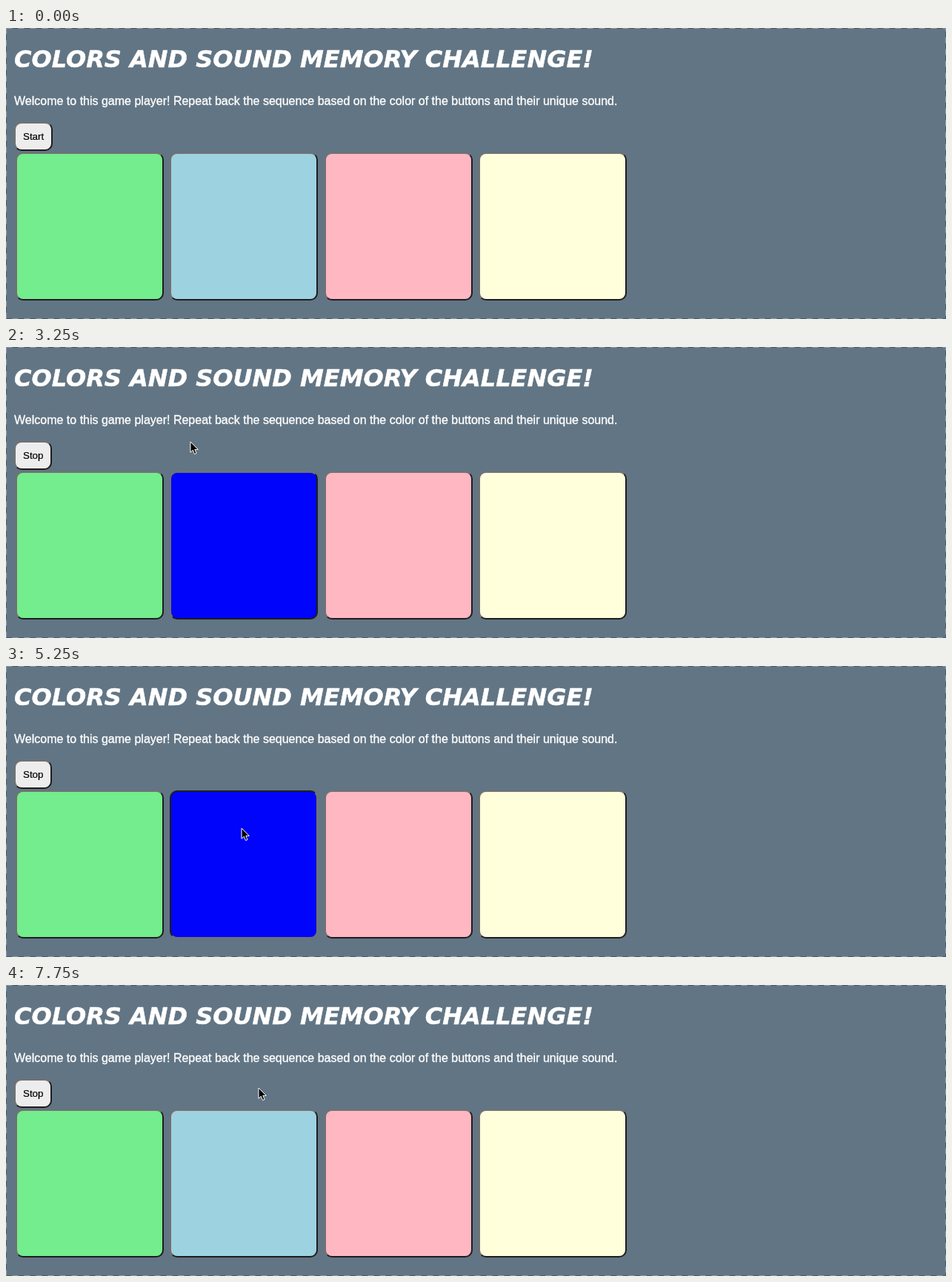
Recreate the animation shown at these times as an HTML page. Size 1269 by 393 pixels, loop 8 s.

```html
<!DOCTYPE html>
<html lang="en">
<head>
<meta charset="utf-8">
<title>Memory game</title>
<style>
  html, body { margin: 0; width: 100%; height: 100%; overflow: hidden; background: #627584; }
  #stage { position: absolute; left: 0; top: 0; width: 1269px; height: 393px; overflow: hidden; }
  .btn {
    position: absolute; box-sizing: border-box; border: 2px solid; border-radius: 10px;
    border-color: #737171 #1d1d1d #1d1d1d #737171;
  }
  .btn.down { border-color: #1d1d1d #737171 #737171 #1d1d1d; }
  .pad { top: 168px; width: 200px; height: 200px; }
  #toggle { left: 11px; top: 127px; height: 39px; background: #ededed; }
  svg { position: absolute; left: 0; top: 0; }
  text { font-family: "Liberation Sans", Arial, sans-serif; fill: #fff; stroke: #fff; stroke-width: .35px; }
  .title { font: italic bold 32px "DejaVu Sans", Verdana, sans-serif; stroke-width: .5px; }
  #label { fill: #000; stroke: #000; stroke-width: .2px; }
</style>
</head>
<body>
<div id="stage">
  <div id="toggle" class="btn"></div>
  <svg width="1269" height="393" viewBox="0 0 1269 393">
    <rect x=".5" y=".5" width="1268" height="392" fill="none" stroke="#4a5964"/>
    <rect x=".5" y=".5" width="1268" height="392" fill="none" stroke="#8e9ba6" stroke-dasharray="8 8"/>
    <text class="title" x="11" y="53">COLORS AND SOUND MEMORY CHALLENGE!</text>
    <text x="11" y="104" font-size="16">Welcome to this game player! Repeat back the sequence based on the color of the buttons and their unique sound.</text>
    <text id="label" x="23" y="151" font-size="13.333">Start</text>
    <path id="arrow" d="M1 1V15.3L4.3 12.2 6.5 17.6 9 16.6 6.8 11.4H11.3Z" fill="#000" stroke="#fff"/>
  </svg>
</div>
<script>
  const LOOP = 8000, STEP = 250;
  const $ = id => document.getElementById(id);
  const stage = $('stage'), toggle = $('toggle'), label = $('label'), arrow = $('arrow');

  const pads = ['#73ed8d', '#9dd2e1', '#ffb7c2', '#ffffdc'].map((color, i) => {
    const pad = document.createElement('div');
    pad.className = 'btn pad';
    pad.style.left = Math.round(13 + 208.445 * i) + 'px';
    pad.style.background = color;
    stage.insertBefore(pad, toggle);
    return pad;
  });
  const blue = pads[1];

  // each move ends at a time and place; most take a single step
  const moves = [
    { at: 500, x: 948, y: 85 },
    { at: 1000, x: 385, y: 121 },
    { at: 1500, x: 34, y: 149, steps: 2 },
    { at: 2750, x: 248, y: 127, steps: 2 },
    { at: 4250, x: 265, y: 122 },
    { at: 4500, x: 324, y: 131 },
    { at: 5250, x: 317, y: 218, steps: 2 },
    { at: 6000, x: 340, y: 138 }
  ];

  const easeOut = p => 1 - (1 - p) ** 3;
  const clamp = p => Math.min(1, Math.max(0, p));
  const within = (t, from, to) => t >= from && t < to;

  function pointer(t) {
    let x = 1007, y = 75;
    for (const m of moves) {
      const p = easeOut(clamp(1 + (t - m.at) / ((m.steps || 1) * STEP)));
      x += (m.x - x) * p;
      y += (m.y - y) * p;
    }
    return `translate(${Math.round(x)} ${Math.round(y)})`;
  }

  function draw(time) {
    const t = Math.floor(time / STEP) * STEP;
    arrow.setAttribute('visibility', t >= STEP ? 'visible' : 'hidden');
    arrow.setAttribute('transform', pointer(t));

    const playing = t >= 2250;
    label.textContent = playing ? 'Stop' : 'Start';
    toggle.style.width = (playing ? 51 : 52) + 'px';
    toggle.classList.toggle('down', within(t, 2000, 2250));

    const pressed = within(t, 5250, 5750);
    const lit = pressed || within(t, 3250, 4250) || within(t, 6750, 7750);
    blue.classList.toggle('down', pressed);
    blue.style.background = lit ? '#0004fb' : '#9dd2e1';
  }

  const start = performance.now();
  function tick() {
    draw((performance.now() - start) % LOOP);
    requestAnimationFrame(tick);
  }
  tick();
</script>
</body>
</html>
```
